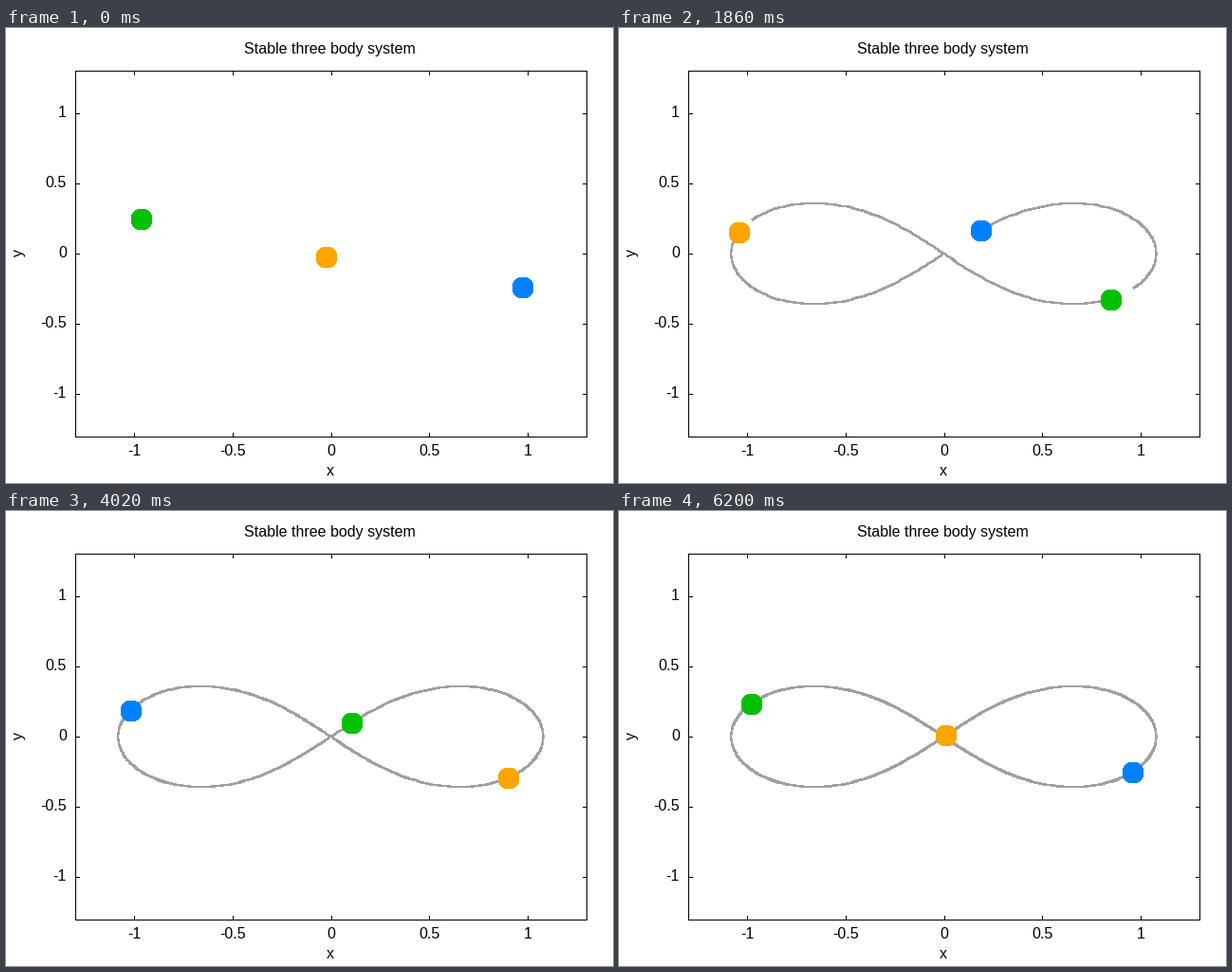
Animation, 640 px wide and 480 px high, one loop 6.22 s. Source, as a matplotlib script:

```python
import numpy as np
import matplotlib.pyplot as plt
from matplotlib.animation import FuncAnimation
from matplotlib.patches import Circle

plt.rcParams["font.family"] = "Liberation Sans"
plt.rcParams["path.simplify"] = False
plt.rcParams["path.snap"] = False

W, H, DPI = 640, 480, 100
PX = 72 / DPI                      # one pixel in points
FRAMES, INTERVAL = 311, 20
DT, SUBSTEPS = 0.0203, 4

LEFT, RIGHT, TOP, BOTTOM = 73, 612, 45, 431
LIMIT = 1.3
COLORS = ["#0080ff", "#00c000", "#ffa500"]
TRAIL = "#a0a0a0"


def to_px(x, y):
    """Data coordinates to whole stage pixels."""
    sx = (RIGHT - LEFT) / (2 * LIMIT)
    sy = (BOTTOM - TOP) / (2 * LIMIT)
    return np.round(342.4 + sx * x), np.round(238 - sy * y)


def deriv(state):
    pos, vel = state
    gap = pos[None, :] - pos[:, None]
    dist = np.sqrt((gap ** 2).sum(axis=2)) + np.eye(3)
    return np.array([vel, (gap / dist[..., None] ** 3).sum(axis=1)])


def rk4(s, h):
    k1 = deriv(s)
    k2 = deriv(s + h / 2 * k1)
    k3 = deriv(s + h / 2 * k2)
    k4 = deriv(s + h * k3)
    return s + h / 6 * (k1 + 2 * k2 + 2 * k3 + k4)


def simulate():
    """Figure-eight orbit of three equal masses, one row per time step."""
    p = np.array([0.97000436, -0.24308753])
    v = np.array([-0.93240737, -0.86473146])
    state = np.array([[p, -p, 0 * p], [-v / 2, -v / 2, v]])
    path = [state[0]]
    for _ in range(FRAMES):
        for _ in range(SUBSTEPS):
            state = rk4(state, DT / SUBSTEPS)
        path.append(state[0])
    return np.array(path)


orbit = simulate()
px, py = to_px(orbit[..., 0], orbit[..., 1])

fig = plt.figure(figsize=(W / DPI, H / DPI), dpi=DPI, facecolor="white")
ax = fig.add_axes([0, 0, 1, 1])
ax.set_xlim(0, W)
ax.set_ylim(H, 0)
ax.axis("off")


def label(x, y, s, ha="center", va="baseline", **kw):
    ax.text(x, y, s, ha=ha, va=va, fontsize=16 * PX, color="black", **kw)


def hline(x0, x1, y):
    """Fill pixels x0..x1 of row y."""
    ax.plot([x0, x1 + 1], [y + 0.5] * 2, color="black", lw=PX,
            solid_capstyle="butt", antialiased=False, zorder=5)


def vline(x, y0, y1):
    """Fill pixels y0..y1 of column x."""
    ax.plot([x + 0.5] * 2, [y0, y1 + 1], color="black", lw=PX,
            solid_capstyle="butt", antialiased=False, zorder=5)


def draw_axes():
    for y in (TOP, BOTTOM):
        hline(LEFT, RIGHT, y)
    for x in (LEFT, RIGHT):
        vline(x, TOP, BOTTOM)
    for v in (-1, -0.5, 0, 0.5, 1):
        tx, ty = round(342.6 + 207.3 * v), round(238 - 148 * v)
        vline(tx, TOP, TOP + 4)
        vline(tx, BOTTOM - 4, BOTTOM)
        hline(LEFT, LEFT + 4, ty)
        hline(RIGHT - 4, RIGHT, ty)
        label(tx, 451, f"{v:g}")
        label(64, ty + 4, f"{v:g}", ha="right")
    label(341, 27, "Stable three body system")
    label(342, 472, "x")
    label(21, 237, "y", ha="right", va="center", rotation=90)


draw_axes()
trails = [ax.plot([], [], color=TRAIL, lw=1.5 * PX, antialiased=False,
                  solid_joinstyle="round", zorder=2)[0] for _ in COLORS]
bodies = [ax.add_patch(Circle((0, 0), 11, fc=c, ec="none", lw=0,
                              antialiased=False, zorder=3)) for c in COLORS]


def update(n):
    for i, (trail, body) in enumerate(zip(trails, bodies)):
        trail.set_data(px[:n + 2, i], py[:n + 2, i])
        body.center = (px[n + 1, i], py[n + 1, i] + 1)
    return trails + bodies


anim = FuncAnimation(fig, update, frames=FRAMES, interval=INTERVAL,
                     init_func=lambda: update(0), repeat=True, repeat_delay=0)
plt.show()
```
